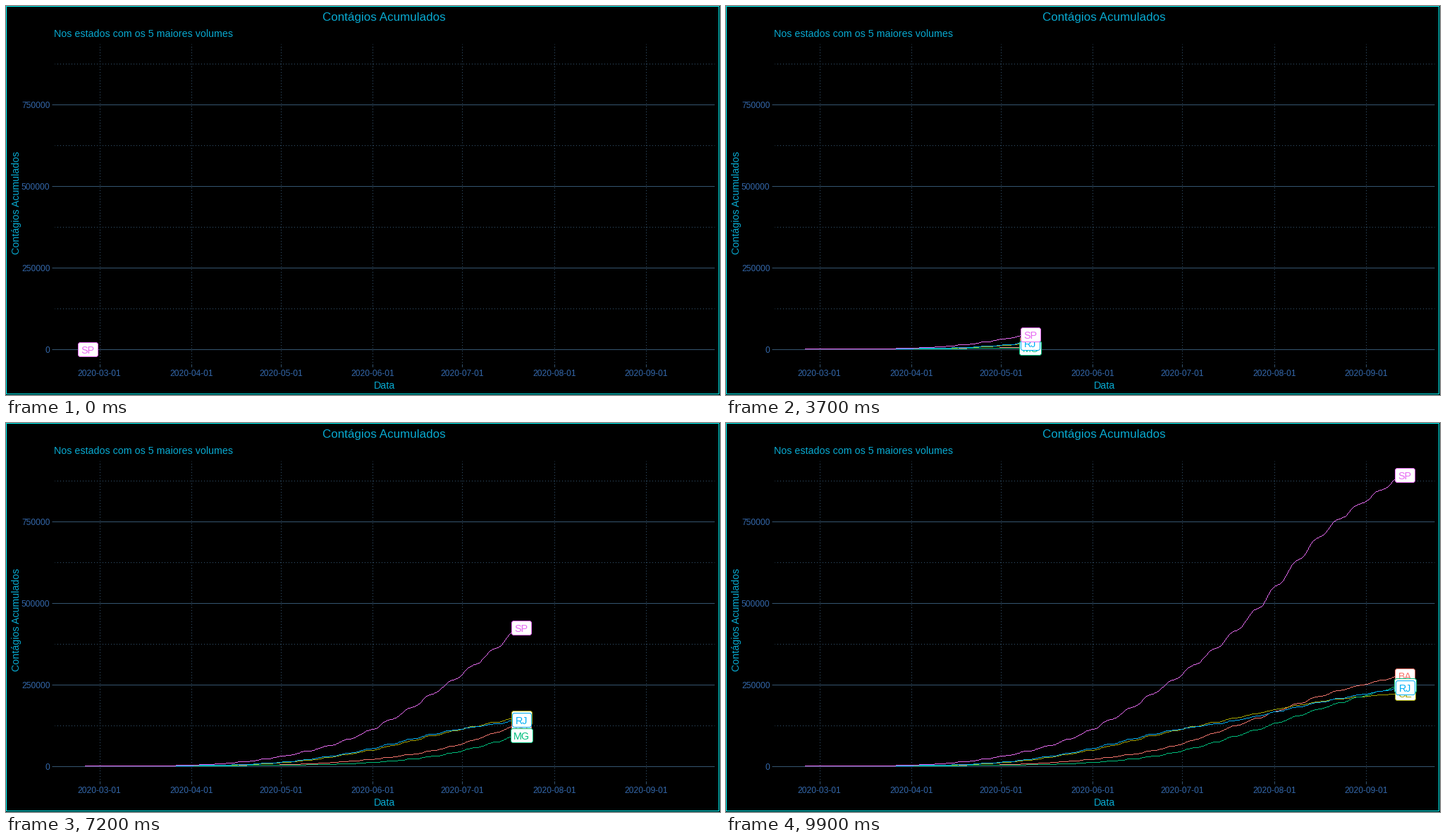
Recreate the animation shown at these times as a matplotlib script. Size 1013 px wide and 553 px high, loop 10 s.

```python
import numpy as np
import matplotlib.pyplot as plt
from matplotlib.animation import FuncAnimation
from matplotlib.patches import FancyBboxPatch, Rectangle

W, H, DPI = 1013, 553, 64
FRAMES, STEP_MS = 100, 100
LAST_DAY = 202
LEFT, RIGHT, TOP, BOTTOM = 69, 1005, 54, 509
CYAN, TITLE, TICK, GRID = "#00FFFF", "#08A9D0", "#3468AB", "#34546F"
FONT = "Liberation Sans"
MONTH_DAYS = np.cumsum([5, 31, 30, 31, 30, 31, 31])

# state: colour, first day, box width, thousands of cases every four weeks
STATES = {
    "BA": ("#F8766D", 10, 28, [.2, 2.3, 14.2, 47, 124, 213, 279]),
    "CE": ("#A3A500", 20, 29, [.4, 6.7, 36.2, 93, 147.5, 197, 223.5]),
    "MG": ("#00BF7D", 12, 31, [.3, 1.6, 7, 29.5, 92, 175, 249]),
    "RJ": ("#00B0F6", 9, 27, [.7, 7.9, 40, 97.5, 139.5, 195, 241]),
    "SP": ("#E76BF3", 0, 28, [1.5, 21.7, 83.6, 222, 416.4, 702.7, 893]),
}


def pt(px):
    return px * 72 / DPI


def x_of(day):
    return 112 + 4.216 * day


def y_of(thousands):
    return 488.5 - .464 * thousands


def day_at(frame):
    return 2 * frame + 1 + frame // 25


def growth(keys, day):
    """Cubic curve through the square roots of the key values."""
    roots = np.sqrt([0, *keys])
    slopes = np.gradient(roots)
    pos = np.clip((day - 6) / 28, 0, len(roots) - 1.001)
    i = pos.astype(int)
    t = pos - i
    ease = t * t * (3 - 2 * t)
    root = (roots[i] + ease * (roots[i + 1] - roots[i])
            + t * (1 - t) ** 2 * slopes[i] - t * t * (1 - t) * slopes[i + 1])
    return root ** 2


def daily(keys):
    """Reports run ahead midweek and stall around each weekend."""
    day = np.arange(LAST_DAY + 1)
    phase = (day + 1) / 7 - .12
    return growth(keys, day + .735 * (1 - np.cos(2 * np.pi * phase)))


def trace(xs, ys):
    """Whole pixels along a polyline, one pixel thick."""
    points = np.floor(np.column_stack([xs, ys]))
    parts = []
    for a, b in zip(points, points[1:]):
        n = int(np.abs(b - a).max())
        parts.append(a + (b - a) * np.arange(n)[:, None] / n)
    return np.rint(np.concatenate(parts)).T


fig = plt.figure(figsize=(W / DPI, H / DPI), dpi=DPI, facecolor="black")
ax = fig.add_axes([0, 0, 1, 1])
ax.set_xlim(0, W)
ax.set_ylim(H, 0)
ax.axis("off")


def write(x, y, text, px, color, ha="center", **kw):
    return ax.text(x, y, text, fontsize=pt(px), color=color, family=FONT,
                   ha=ha, va="baseline", **kw)


def rule(xs, ys, dotted=False):
    # whole coordinates snap to the centre of that pixel row or column
    ax.plot(np.floor(xs), np.floor(ys), color=GRID, lw=pt(1), zorder=1,
            ls=(.5, (1, 3)) if dotted else "-", dash_capstyle="butt",
            solid_capstyle="butt")


def draw_scene():
    ax.add_patch(Rectangle((0, 0), W - 2, H - 2, fill=False, ec=CYAN, lw=pt(1)))
    for k in range(0, 1000, 125):
        y = y_of(k)
        if k % 250:
            rule([LEFT, RIGHT], [y, y], dotted=True)
        else:
            rule([LEFT - 4, RIGHT], [y, y])
            write(62.5, y + 4.8, str(k * 1000), 12, TICK, ha="right")
    for month, day in enumerate(MONTH_DAYS, 3):
        x = x_of(day)
        rule([x, x], [TOP, BOTTOM], dotted=True)
        rule([x, x], [BOTTOM, BOTTOM + 4])
        write(x - .4, 526, f"2020-{month:02d}-01", 12, TICK)
    write(536.7, 21, "Contágios Acumulados", 17, TITLE)
    write(68.5, 44.3, "Nos estados com os 5 maiores volumes", 14.25, TITLE, ha="left")
    write(536.7, 544.5, "Data", 14.25, TITLE)
    write(19.5, 280, "Contágios Acumulados", 14.25, TITLE,
          rotation=90, rotation_mode="anchor")


class Series:
    def __init__(self, name, order):
        color, self.start, self.width, keys = STATES[name]
        self.xs = x_of(np.arange(LAST_DAY + 1))
        self.ys = y_of(daily(keys))
        self.path = trace(self.xs[self.start:], self.ys[self.start:])
        self.line, = ax.plot([], [], ",", color=color, markeredgewidth=0,
                             zorder=3 + order * .1)
        z = 5 + order
        self.box = FancyBboxPatch((0, 0), self.width, 20, fc="white",
                                  ec=color, lw=pt(1), zorder=z,
                                  boxstyle="round,pad=0,rounding_size=2.9")
        ax.add_patch(self.box)
        self.text = write(0, 0, name, 14.4, color, zorder=z + .5)

    def show(self, day):
        parts = [self.line, self.box, self.text]
        for part in parts:
            part.set_visible(day >= self.start)
        x, y = self.xs[day], self.ys[day]
        self.line.set_data(*self.path[:, self.path[0] <= x])
        left, top = np.floor(x - self.width / 2) + .5, np.floor(y) - 9.5
        self.box.set_bounds(left, top, self.width, 20)
        self.text.set_position((x - .4, top + 15.5))
        return parts


draw_scene()
series = [Series(name, i) for i, name in enumerate(STATES)]


def update(frame):
    day = day_at(frame)
    return [part for s in series for part in s.show(day)]


anim = FuncAnimation(fig, update, frames=FRAMES, interval=STEP_MS,
                     init_func=lambda: update(0), repeat=True, repeat_delay=0)
plt.show()
```
